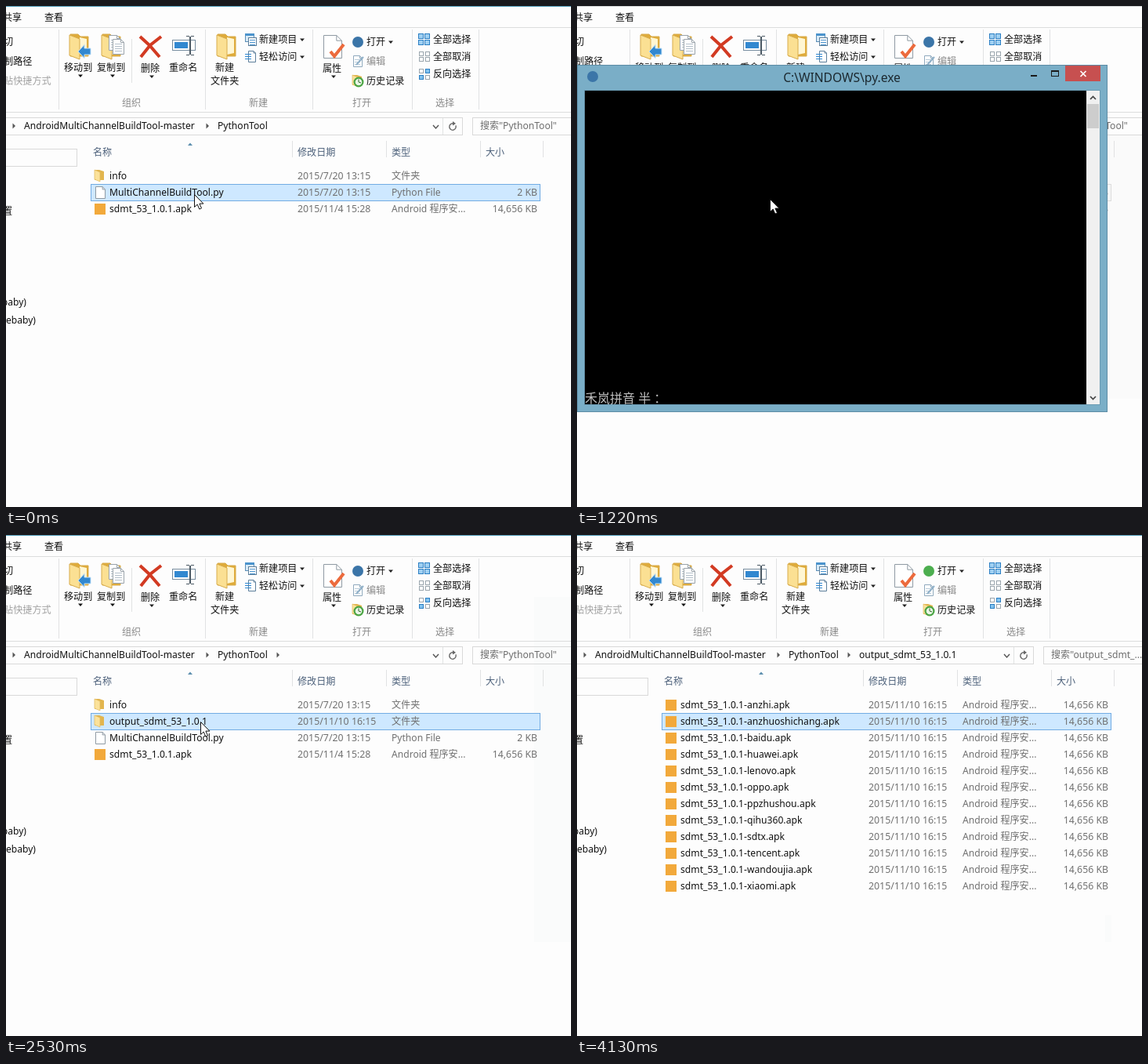
Recreate the animation shown at these times as an HTML page with a canvas. Size 721x639 px, loop 4.81 s.

```html
<!DOCTYPE html>
<html lang="zh">
<head>
<meta charset="utf-8">
<title>Build tool demo</title>
<style>
html, body { margin: 0; width: 100%; height: 100%; overflow: hidden; background: #fefefe; }
canvas { display: block; }
</style>
</head>
<body>
<canvas id="stage" width="721" height="639"></canvas>
<script>
const LOOP = 4810;
const SANS = '"Noto Sans", "Noto Sans CJK SC", "Noto Sans CJK", sans-serif';
const INK = '#111', GREY = '#707070', PALE = '#a2a2a2', LINE = '#dcdddd';
const stage = document.getElementById('stage').getContext('2d');
const consoleBuf = document.createElement('canvas');
consoleBuf.width = 678;
consoleBuf.height = 444;
let c = stage;

// Last value whose start time has passed.
function at(t, steps) {
  let value = steps[0][1];
  for (const [start, v] of steps) if (t >= start) value = v;
  return value;
}

function rect(x, y, w, h, fill) {
  c.fillStyle = fill;
  c.fillRect(x, y, w, h);
}

function box(x, y, w, h, fill, edge) {
  if (fill) rect(x, y, w, h, fill);
  c.strokeStyle = edge;
  c.lineWidth = 1;
  c.strokeRect(x + .5, y + .5, w - 1, h - 1);
}

function poly(points, fill, edge, width = 1) {
  c.beginPath();
  points.forEach(([x, y], i) => i ? c.lineTo(x, y) : c.moveTo(x, y));
  c.closePath();
  if (fill) { c.fillStyle = fill; c.fill(); }
  if (edge) { c.strokeStyle = edge; c.lineWidth = width; c.stroke(); }
}

function path(points, edge, width = 1) {
  c.beginPath();
  points.forEach(([x, y], i) => i ? c.lineTo(x, y) : c.moveTo(x, y));
  c.strokeStyle = edge;
  c.lineWidth = width;
  c.stroke();
}

function disc(x, y, r, fill) {
  c.beginPath();
  c.arc(x, y, r, 0, 7);
  c.fillStyle = fill;
  c.fill();
}

// Text centred vertically on y.
function text(str, x, y, color = INK, size = 12.1, align = 'left') {
  c.font = size + 'px ' + SANS;
  c.textAlign = align;
  c.fillStyle = color;
  c.fillText(str, x, y + size * .36);
}

const vline = (x, y1, y2) => rect(x, y1, 1, y2 - y1, '#e1e2e3');
const dropMark = (x, y, color = '#222') => poly([[x - 3, y - 1.5], [x + 3, y - 1.5], [x, y + 2]], color);
const crumbMark = (x, y) => poly([[x - 1.5, y - 3.5], [x + 2, y], [x - 1.5, y + 3.5]], '#555');

function bigFolder(x, dim) {
  const [back, front, edge] = dim ? ['#a9bccb', '#ccd8e1', '#9cb0c0'] : ['#dfab3a', '#fbe093', '#d8ac4c'];
  poly([[x + 1, 36], [x + 11, 36], [x + 14, 39], [x + 24, 39], [x + 24, 64], [x + 1, 64]], back, edge);
  poly([[x + 13, 40], [x + 22, 42], [x + 22, 60], [x + 13, 62]], dim ? '#e6ecf1' : '#fff6d2');
  poly([[x, 37], [x + 13, 42], [x + 13, 68], [x, 63]], front, edge);
}

function smallFolder(x, y) {
  poly([[x + 1, y - 7], [x + 7, y - 7], [x + 13, y - 5], [x + 13, y + 6], [x + 1, y + 6]], '#e2b54e');
  poly([[x + 1, y - 7], [x + 8, y - 4], [x + 8, y + 8], [x + 1, y + 5]], '#fbe29a', '#e0b85e', .7);
}

function page(x, y, w, h, edge = '#8f9aa3') {
  const f = w * .3;
  poly([[x + .5, y + .5], [x + w - f, y + .5], [x + w - .5, y + f], [x + w - .5, y + h - .5], [x + .5, y + h - .5]], '#fff', edge);
  path([[x + w - f, y + .5], [x + w - f, y + f], [x + w - .5, y + f]], edge);
}

function lines(x, y, w, n, color) {
  for (let i = 0; i < n; i++) rect(x, y + 3 * i, w, 1, color);
}

function organizeGroup(dim) {
  const blue = dim ? '#a4b6c4' : '#3288d0';
  const label = dim ? PALE : INK;
  bigFolder(81, dim);
  poly([[92, 58], [100, 49.5], [100, 54], [108, 54], [108, 62], [100, 62], [100, 66.5]], blue, dim ? '#d5dee5' : '#bfe0f7');
  bigFolder(122, dim);
  for (const [x, y] of [[131, 37], [136, 42]]) {
    page(x, y, 15, 20, dim ? '#aebdc9' : '#9aa3aa');
    lines(x + 3, y + 6, 9, 4, '#b3bfc9');
  }
  const red = dim ? '#8799aa' : '#d23a22';
  path([[171, 39], [183, 50], [196, 65]], red, 4);
  path([[198, 39], [184, 50], [172, 65]], red, 4);
  box(212, 43, 30, 14, '#fff', dim ? '#a9b8c4' : '#778c9e');
  rect(215, 46, 17, 8, blue);
  const bar = dim ? '#9fafbd' : '#4b5964';
  rect(234, 39, 2, 23, bar);
  rect(230, 38, 4, 1, bar); rect(236, 38, 4, 1, bar);
  rect(230, 62, 4, 1, bar); rect(236, 62, 4, 1, bar);
  text('移动到', 74, 79, label);
  text('复制到', 116, 79, label);
  text('删除', 172, 80);
  text('重命名', 208, 79, label);
  dropMark(95, 89, label);
  dropMark(136, 89, label);
  dropMark(186, 90);
  vline(160, 42, 98);
}

function createGroup() {
  bigFolder(269);
  text('新建', 267, 79);
  text('文件夹', 261, 96);
  box(305, 35, 12, 11, '#d9ebf8', '#5b8db5');
  rect(305, 35, 12, 3, '#4c94cd');
  box(309, 40, 11, 11, '#fff', '#5c7e9a');
  lines(311, 43, 7, 3, '#4c94cd');
  page(309, 57, 10, 15, '#5c7e9a');
  lines(305, 61, 8, 3, '#3288d0');
  text('新建项目', 323, 43);
  text('轻松访问', 323, 65);
  dropMark(378, 43);
  dropMark(378, 65);
}

function openGroup(openColor, dim) {
  page(405, 37, 24, 30);
  path([[414, 58], [419, 64], [431, 49]], '#ec6a3c', 4);
  text('属性', 404, 80);
  dropMark(418, 90);
  disc(449, 46, 7, openColor);
  text('打开', 460, 46, dim ? PALE : INK);
  dropMark(491, 46, dim ? PALE : '#222');
  page(443, 63, 12, 15, '#8fa9bd');
  lines(445, 68, 7, 3, '#b7cad8');
  path([[447, 75], [456, 65]], '#8fb0c8', 2);
  text('编辑', 460, 71, '#888');
  smallFolder(441, 95);
  disc(450, 97, 6.5, '#4aa443');
  disc(450, 97, 4.3, '#e9f6e6');
  path([[450, 93.5], [450, 97], [453, 98]], '#356b2f');
  text('历史记录', 460, 96);
}

function selectGroup() {
  const tile = (x, y, full) => box(x, y, 6, 6, full ? '#84c3ee' : '#fff', full ? '#2b7fc4' : '#9aa5ad');
  for (let i = 0; i < 4; i++) {
    const dx = i % 2, dy = i >> 1;
    box(526 + dx * 8, 35 + dy * 8, 7, 7, '#9fd0f2', '#2b7fc4');
    tile(527 + dx * 8, 58 + dy * 7, false);
    tile(527 + dx * 8, 80 + dy * 8, dx !== dy);
  }
  text('全部选择', 545, 43);
  text('全部取消', 545, 65);
  text('反向选择', 545, 87);
}

function ribbon(s) {
  rect(0, 0, 721, 1, s.active ? '#4f9bb8' : '#d0d2d3');
  text('共享', -4, 15);
  text('查看', 49, 15);
  rect(0, 27, 721, 1, LINE);
  text('剪切', -15, 46);
  text('复制路径', -15, 71);
  text('粘贴快捷方式', -15, 96, PALE);
  for (const x of [67, 254, 391, 518, 603]) vline(x, 30, 132);
  organizeGroup(s.dim);
  createGroup();
  openGroup(s.openColor, s.dim);
  selectGroup();
  [['组织', 148], ['新建', 310], ['打开', 442], ['选择', 548]].forEach(([label, x]) => text(label, x, 124, '#8a8a8a'));
  rect(0, 135, 721, 1, LINE);
}

function addressBar(s) {
  box(-2, 142, 585, 23, null, '#d9d9d9');
  vline(557, 143, 164);
  crumbMark(10, 153);
  text('AndroidMultiChannelBuildTool-master', 23, 153);
  crumbMark(257, 153);
  text('PythonTool', 270, 153);
  if (s.crumb) crumbMark(347, 153);
  if (s.inside) text('output_sdmt_53_1.0.1', 360, 153);
  path([[545, 152], [548.5, 156], [552, 152]], '#555', 1.4);
  c.beginPath();
  c.arc(570, 154, 4.2, -.4, 4.9);
  c.strokeStyle = '#666';
  c.lineWidth = 1.4;
  c.stroke();
  poly([[570, 147], [574, 150], [570, 152.5]], '#666');
  box(595, 142, 140, 23, null, '#d9d9d9');
  text(s.inside ? '搜索"output_sdmt_...' : '搜索"PythonTool"', 605, 153, '#6d6d6d');
}

function sidebar() {
  box(-2, 182, 93, 23, null, '#d9d9d9');
  text('置', -4, 262);
  text('baby)', 26, 378, INK, 12.1, 'right');
  text('ebaby)', 38, 401, INK, 12.1, 'right');
}

const folder = (name, date) => ({ kind: 'dir', name, date, type: '文件夹', size: '' });
const apk = (name, date) => ({ kind: 'apk', name, date, type: 'Android 程序安...', size: '14,656 KB' });
const infoDir = folder('info', '2015/7/20 13:15');
const outputDir = folder('output_sdmt_53_1.0.1', '2015/11/10 16:15');
const script = { kind: 'py', name: 'MultiChannelBuildTool.py', date: '2015/7/20 13:15', type: 'Python File', size: '2 KB' };
const baseApk = apk('sdmt_53_1.0.1.apk', '2015/11/4 15:28');
const before = [infoDir, script, baseApk];
const after = [infoDir, outputDir, script, baseApk];
const channels = 'anzhi anzhuoshichang baidu huawei lenovo oppo ppzhushou qihu360 sdtx tencent wandoujia xiaomi'
  .split(' ').map(n => apk(`sdmt_53_1.0.1-${n}.apk`, '2015/11/10 16:15'));

function fileIcon(kind, y) {
  if (kind === 'dir') smallFolder(112, y - 1);
  else if (kind === 'py') page(114, y - 8, 13, 16);
  else rect(113, y - 7, 14, 14, '#f2a93b');
}

function fileList(s) {
  [['名称', 111], ['修改日期', 372], ['类型', 492], ['大小', 612]].forEach(([label, x]) => text(label, x, 187, '#4c607a'));
  for (const x of [365, 485, 605, 685]) vline(x, 172, 193);
  poly([[232, 178], [235, 174.5], [238, 178]], '#5d8fae');
  const mark = (i, fill, edge) => box(108, 206 + 21 * i, 574, 22, fill, edge);
  if (s.hover >= 0 && s.hover !== s.selected) mark(s.hover, '#e5f3fb', '#a5d5ee');
  if (s.selected >= 0) {
    if (s.active) mark(s.selected, '#cee8ff', '#72ace3');
    else mark(s.selected, '#f7f7f7', '#dcdcdc');
  }
  s.rows.forEach((row, i) => {
    const y = 217 + 21 * i;
    fileIcon(row.kind, y);
    text(row.name, 132, y, INK, 12.15);
    text(row.date, 372, y, GREY, 12.35);
    text(row.type, 492, y, GREY);
    text(row.size, 678, y, GREY, 12.3, 'right');
  });
}

function drawConsole(caret) {
  c = consoleBuf.getContext('2d');
  c.setTransform(1, 0, 0, 1, 0, -75);
  box(0, 75, 677, 443, '#7aaec7', '#5c8ca5');
  disc(20, 90, 7, '#3b75a8');
  text('C:\\WINDOWS\\py.exe', 338, 91.5, '#1c2930', 15.6, 'center');
  rect(579, 88, 8, 2, '#1a1a1a');
  box(605, 82, 10, 8, null, '#1a1a1a');
  rect(605, 82, 10, 2, '#1a1a1a');
  rect(623, 76, 45, 20, '#c75050');
  path([[642.5, 83], [649.5, 90]], '#fff', 1.7);
  path([[649.5, 83], [642.5, 90]], '#fff', 1.7);
  rect(9, 107, 659, 402, '#6a9bb3');
  rect(10, 108, 640, 400, '#000');
  rect(650, 108, 17, 400, '#f0f0f0');
  rect(651, 125, 15, 31, '#cdcdcd');
  path([[655, 119], [658.5, 115.5], [662, 119]], '#444', 1.7);
  path([[655, 498], [658.5, 501.5], [662, 498]], '#444', 1.7);
  text('禾岚拼音 半 ：', 10, 500, '#c0c0c0', 16);
  if (caret) rect(10, 120, 8, 4, '#c8c8c8');
  c = stage;
}

// Corner set: top y, left, right; bottom y, left, right; opacity.
function placeConsole([y0, l0, r0, y1, l1, r1, alpha]) {
  c.globalAlpha = alpha;
  if (alpha === 1) c.drawImage(consoleBuf, 0, 75);
  else for (let y = y0; y < y1; y++) {
    const k = (y - y0) / (y1 - y0);
    const x = l0 + (l1 - l0) * k;
    const w = r0 + (r1 - r0) * k - x;
    c.drawImage(consoleBuf, 0, Math.min(442, k * 443), 677, 1, x, y, w, 1);
  }
  c.globalAlpha = 1;
}

function pointer([x, y]) {
  const shape = [[0, 0], [0, 16], [3.7, 12.6], [6.3, 18.6], [9, 17.4], [6.4, 11.6], [11.4, 11.6]];
  poly(shape.map(([a, b]) => [x + .5 + a, y + .5 + b]), '#fff', '#111');
}

const WINDOW = [
  [0, null],
  [150, [80, 14, 663, 505, 22, 655, .4]],
  [280, [76, 3, 674, 513, 6, 671, .88]],
  [430, [75, 0, 677, 518, 0, 677, 1]],
  [1650, [79, 3, 671, 517, 0, 675, .9]],
  [1770, [84, 8, 663, 516, 1, 672, .65]],
  [1920, [92, 16, 650, 513, 3, 667, .3]],
  [2040, [98, 22, 642, 510, 5, 662, .08]],
  [2160, null]
];
const POINTER = [
  [0, [240, 240]], [580, [242, 242]], [700, [245, 245]], [820, [246, 246]],
  [1770, [246, 248]], [2160, [247, 243]], [2280, [248, 238]],
  [3070, [244, 244]], [3190, [238, 262]], [3310, [250, 282]],
  [3460, [272, 318]], [3580, [295, 380]], [3700, [318, 464]],
  [3850, [400, 440]], [3980, [484, 420]], [4130, null]
];
const GHOST = [
  [0, null], [280, [677, 165, 44, 336, '#fafafa']], [1650, [674, 79, 47, 440, '#fafbfb']],
  [2680, [674, 455, 47, 64, '#fafbfb']], [3460, [674, 485, 8, 34, '#fafbfb']]
];

function sceneAt(t) {
  return {
    active: t < 150 || t >= 1650,
    inside: t >= 2680,
    crumb: t >= 2280,
    dim: t >= 2680 && t < 3070,
    openColor: at(t, [[0, '#3b75a8'], [2680, '#a4b6c4'], [3070, '#4cae4f']]),
    rows: at(t, [[0, before], [1510, after], [2680, channels]]),
    selected: at(t, [[0, 1], [1510, 2], [2530, 1], [2680, -1], [2800, 1]]),
    hover: at(t, [[0, -1], [2280, 1], [2530, -1], [3190, 2], [3310, 3], [3460, 5], [3580, 8], [3700, -1]])
  };
}

function draw(t) {
  const s = sceneAt(t);
  rect(0, 0, 721, 639, '#fdfdfd');
  const ghost = at(t, GHOST);
  if (ghost) rect(...ghost);
  ribbon(s);
  addressBar(s);
  sidebar();
  fileList(s);
  const win = at(t, WINDOW);
  if (win) {
    drawConsole((t >= 700 && t < 1220) || t >= 1650);
    placeConsole(win);
  }
  const tip = at(t, POINTER);
  if (tip) pointer(tip);
}

const start = performance.now();
function tick() {
  draw((performance.now() - start) % LOOP);
  requestAnimationFrame(tick);
}
tick();
</script>
</body>
</html>
```
